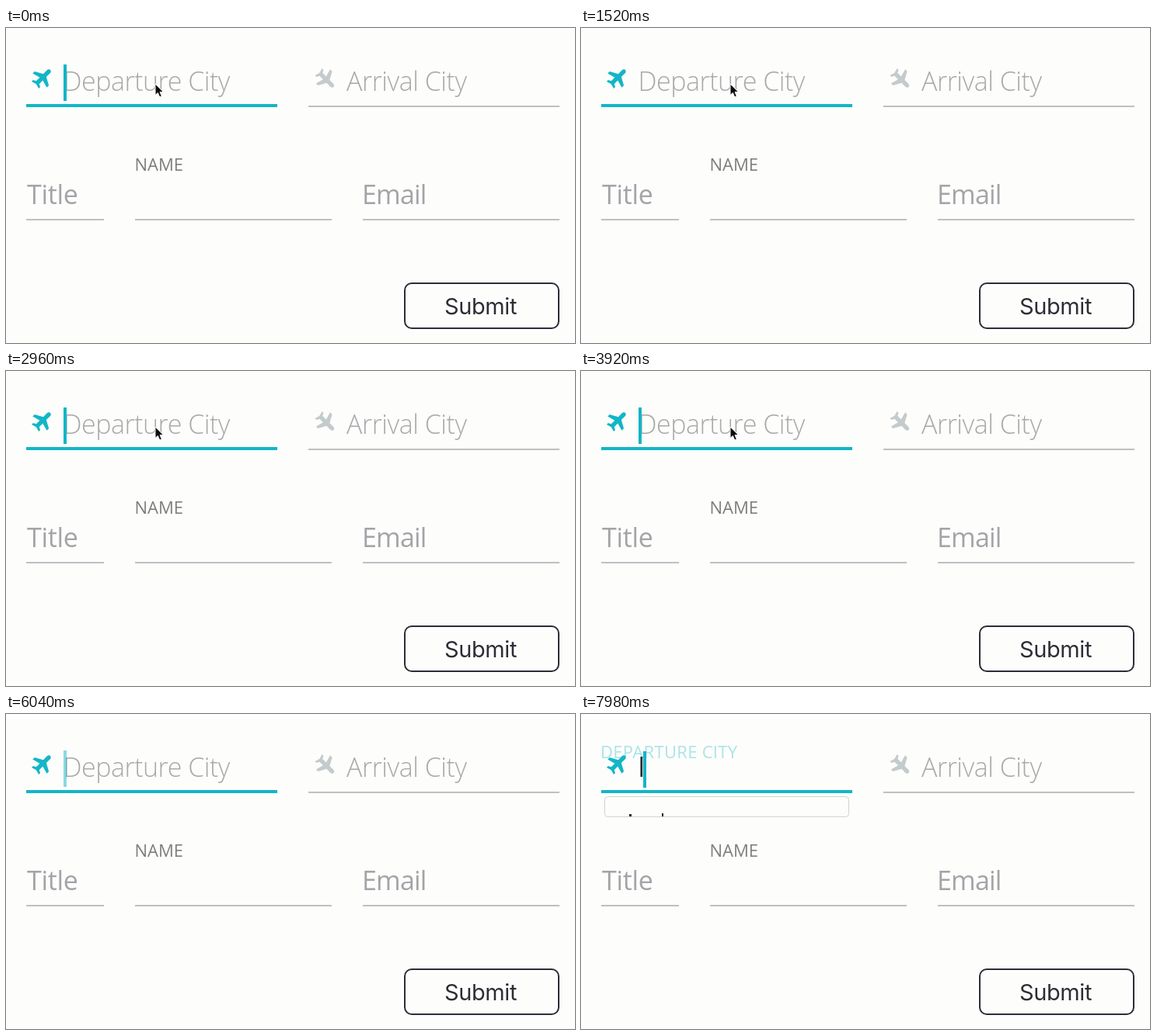
Recreate the animation shown at these times as an HTML page. Size 732 px wide and 406 px high, loop 8000 ms.

```html
<!DOCTYPE html>
<html lang="en">
<head>
<meta charset="utf-8">
<title>Travel form</title>
<style>
  html, body { margin: 0; width: 100%; height: 100%; overflow: hidden; background: #fdfdfc; }
  svg { display: block; width: 732px; height: 406px; }
  text { font-family: "Open Sans", "Noto Sans", sans-serif; }
  .field { font-size: 34px; font-weight: 330; fill: #a9a9aa; letter-spacing: -.5px; }
  .strong { font-weight: 370; fill: #a4a4a8; letter-spacing: -.3px; }
  .label { font-size: 22px; fill: #7e7e7e; }
  .rule { fill: #c0c0c3; }
  .teal { fill: #12b6c6; }
  .typed { font-size: 34px; fill: #2a2a30; }
  .submit { font: 29px Inter, Roboto, sans-serif; fill: #2d2d36; letter-spacing: -.4px; }
  .button { fill: none; stroke: #2d2d38; stroke-width: 2; }
  .panel { fill: none; stroke: #d2d2d2; }
  .ink { fill: #26262b; }
</style>
</head>
<body>
<svg viewBox="0 0 732 406">
  <defs>
    <path id="plane" d="M17 0Q16.500-3 13-3H6L0-14H-4L-1-3H-8L-10-7H-13L-11 0L-13 7H-10L-8 3H-1L-4 14H0L6 3H13Q16.500 3 17 0Z"/>
    <clipPath id="panelClip"><rect id="clipBox" x="30" y="106" width="315" height="26"/></clipPath>
  </defs>

  <rect class="teal" x="26" y="98" width="323" height="4"/>
  <rect class="rule" x="389" y="100" width="323" height="2"/>
  <rect class="rule" x="26" y="246" width="100" height="2"/>
  <rect class="rule" x="166" y="246" width="253" height="2"/>
  <rect class="rule" x="459" y="246" width="253" height="2"/>

  <use href="#plane" class="teal" transform="translate(46 65) rotate(-45) scale(.92)"/>
  <use href="#plane" fill="#c4cbcd" transform="translate(410.500 65) rotate(45) scale(.92)"/>

  <text id="placeholder" class="field" x="73.500" y="81">Departure City</text>
  <text class="field" x="438" y="81">Arrival City</text>
  <text class="field strong" x="27" y="227">Title</text>
  <text class="field strong" x="458" y="227" style="letter-spacing:-.8px">Email</text>
  <text class="label" x="165.500" y="184">NAME</text>

  <rect class="button" x="513" y="329" width="198" height="58" rx="9"/>
  <text class="submit" x="564" y="369">Submit</text>

  <g id="entry">
    <text id="floating" class="label teal" x="25" y="57" letter-spacing=".3">DEPARTURE CITY</text>
    <text class="typed" x="73.500" y="81">l</text>
    <g clip-path="url(#panelClip)" class="ink">
      <rect x="62" y="129" width="3" height="8"/>
      <rect x="104" y="128" width="2" height="9"/>
    </g>
    <rect id="panel" class="panel" x="30.500" y="106.500" width="314" height="26" rx="4"/>
  </g>

  <rect id="caret" class="teal" x="74" y="47" width="4" height="47"/>
  <path id="pointer" d="M0 0V14.500L3.300 11.500L5.700 17L8.300 15.900L6 10.500H10.500Z" fill="#0b0b0b" stroke="#fff" stroke-width="1"/>
</svg>
<script>
const LOOP = 8000, TYPE_AT = 7890, LAST_POSE = 7980;
const BLINK = 950, FADE = 120, FADE_OUT = 340, OFF_TIME = 391;
const pointerPath = [[4840, 192, 72], [4900, 204, 85], [4920, 214, 133], [5020, 220, 160], [5100, 285, 412]];

const el = id => document.getElementById(id);
const set = (id, attrs) => {
  for (const name in attrs) el(id).setAttribute(name, attrs[name]);
};
const clamp = v => Math.min(1, Math.max(0, v));
const mix = (a, b, p) => a + (b - a) * p;

// Phase 0 is the middle of the fade out.
function blinkOpacity(t) {
  const phase = (t + BLINK - FADE_OUT + FADE) % BLINK - FADE;
  const fall = clamp(phase / FADE + 0.5);
  const rise = clamp((phase - OFF_TIME) / FADE + 0.5);
  return 1 - fall + rise;
}

function pointerAt(t) {
  const next = pointerPath.findIndex(p => p[0] > t);
  if (next === 0) return pointerPath[0].slice(1);
  if (next < 0) return pointerPath[pointerPath.length - 1].slice(1);
  const [t0, x0, y0] = pointerPath[next - 1];
  const [t1, x1, y1] = pointerPath[next];
  const p = (t - t0) / (t1 - t0);
  return [mix(x0, x1, p), mix(y0, y1, p)];
}

function render(t) {
  const typed = t >= TYPE_AT;
  const open = clamp((t - TYPE_AT) / (LAST_POSE - TYPE_AT));
  const height = mix(2, 26, open);

  set("placeholder", { visibility: typed ? "hidden" : "visible" });
  set("entry", { visibility: typed ? "visible" : "hidden" });
  set("floating", { y: mix(66, 57, open), opacity: 0.35 * open });
  set("panel", { height });
  set("clipBox", { height });
  set("caret", { x: typed ? 80 : 74, y: typed ? 48 : 47, opacity: typed ? 1 : blinkOpacity(t) });
  set("pointer", { transform: `translate(${pointerAt(t)})` });
}

function tick() {
  render(performance.now() % LOOP);
  requestAnimationFrame(tick);
}
tick();
</script>
</body>
</html>
```
